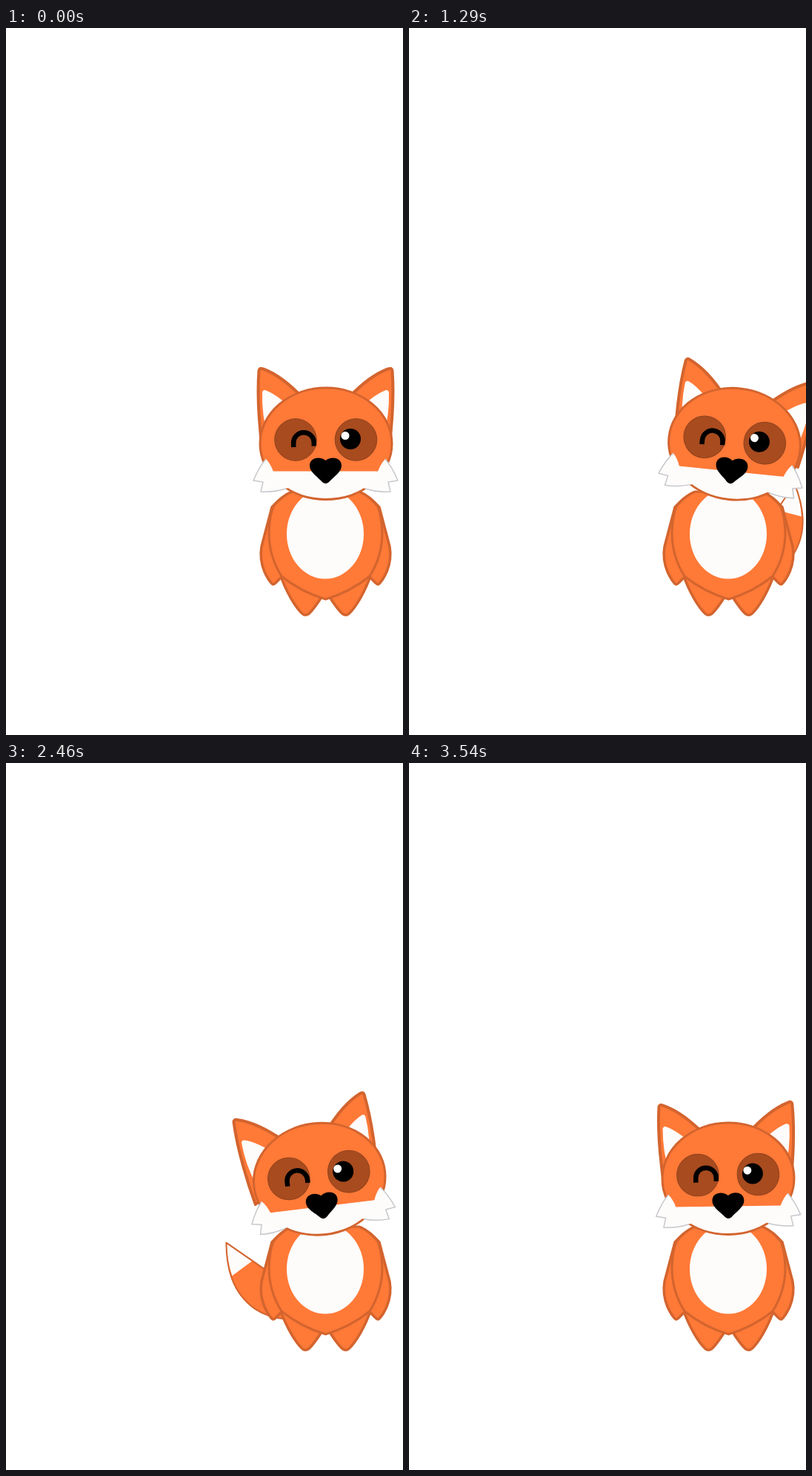
An HTML page with a canvas that plays this animation: 536 px wide and 953 px high, repeating every 3570 ms.

```html
<!DOCTYPE html>
<html lang="en">
<head>
<meta charset="utf-8">
<title>Winking fox</title>
<style>
  html, body { margin: 0; width: 100%; height: 100%; overflow: hidden; background: #fff; }
  canvas { display: block; width: 536px; height: 953px; }
</style>
</head>
<body>
<canvas id="stage" width="536" height="953"></canvas>
<script>
const ctx = document.getElementById('stage').getContext('2d');
const LOOP = 3570, STEP = 30, SWING = 3600;
const AXIS = 431.5;
const NECK = [431.5, 634];
const TAIL_ROOT = [404, 746.5];
const ORANGE = '#ff7937', LINE = '#d3642e', WHITE = '#fdfcfb', PATCH = '#a84b1f';
const path = d => new Path2D(d);

const shapes = {
  tail: path('M279 671C286 703 300 735 335 750Q355 758 380 755L410 735Q400 715 344 698Z'),
  tailTip: path('M279 671L318 688L296 713Q285 695 279 671Z'),
  ear: path('M347 576C343 548 338.500 500 341.500 462Q342 457.500 347 459.500Q373 469 402 500L380 560Z'),
  earInner: path('M346 491Q347 487 351 488.500Q366 494 390 517L354 552Q345 522 346 491Z'),
  leg: path('M370 736C378 760 391 781 400 789.500Q404 793 409 789.500Q416 783 428 764Z'),
  arm: path('M384 626Q371 632 359 646Q353 669 345 699Q342 716 349 733Q354 744 359 749Q361 751 364 748L374 738L400 690Z'),
  torso: path('M431.500 770Q398 760 372 739Q355 712 355 680Q356 657 361 645Q372 631 386 625L477 625Q491 631 502 645Q507 657 508 680Q508 712 491 739Q465 760 431.500 770Z'),
  cheek: path('M351 581Q342 591 334 610L347 612L344 625Q362 626 381 620L390 598L361 598Q357 587 351 581Z'),
  cheekEdge: path('M351 581Q342 591 334 610L347 612L344 625Q362 626 378 621'),
  wink: path('M388.200 565V559A13.800 13.800 0 0 1 415.800 559V563.500'),
  nose: path('M431.500 583C425 577 410 578 410 590C410 599 421 605 427 612Q431.500 616 436 612C442 605 453 599 453 590C453 578 438 577 431.500 583Z')
};

function paint(shape, fill, line, width) {
  if (fill) {
    ctx.fillStyle = fill;
    ctx.fill(shape);
  }
  if (line) {
    ctx.strokeStyle = line;
    ctx.lineWidth = width;
    ctx.stroke(shape);
  }
}

function oval(x, y, rx, ry = rx) {
  const shape = new Path2D();
  shape.ellipse(x, y, rx, ry, 0, 0, Math.PI * 2);
  return shape;
}

function scoped(draw) {
  ctx.save();
  draw();
  ctx.restore();
}

function mirror() {
  ctx.translate(2 * AXIS, 0);
  ctx.scale(-1, 1);
}

function bothSides(draw) {
  draw();
  scoped(() => { mirror(); draw(); });
}

function turned([x, y], degrees, draw) {
  scoped(() => {
    ctx.translate(x, y);
    ctx.rotate(degrees * Math.PI / 180);
    ctx.translate(-x, -y);
    draw();
  });
}

// The tail folds upright behind the body, then fans out on the leaning side.
function drawTail(sway) {
  const reach = Math.abs(sway);
  if (reach < 0.58) return;
  scoped(() => {
    if (sway > 0) mirror();
    turned(TAIL_ROOT, 161 * (0.988 - reach), () => {
      paint(shapes.tail, ORANGE);
      paint(shapes.tailTip, WHITE);
      paint(shapes.tail, null, LINE, 2);
    });
  });
}

function drawBody() {
  bothSides(() => paint(shapes.leg, ORANGE, LINE, 3.5));
  bothSides(() => paint(shapes.arm, ORANGE, LINE, 3.5));
  paint(shapes.torso, ORANGE, LINE, 3);
  paint(oval(431, 682, 52, 60.5), WHITE);
}

function drawEars() {
  bothSides(() => {
    paint(shapes.ear, ORANGE, LINE, 4);
    paint(shapes.earInner, WHITE);
  });
}

function drawHead() {
  const skull = oval(432, 560.3, 89, 75.2);
  paint(skull, ORANGE);
  scoped(() => {
    ctx.clip(skull);
    ctx.fillStyle = WHITE;
    ctx.fillRect(340, 597.5, 184, 45);
  });
  paint(skull, null, LINE, 3);
  bothSides(() => {
    paint(shapes.cheek, WHITE);
    paint(shapes.cheekEdge, null, '#c8c8cd', 1.5);
  });
  for (const x of [391, 472.5]) paint(oval(x, 555, 28.3), PATCH, '#8e421d', 1);
  paint(shapes.wink, null, '#000', 6.5);
  paint(oval(465, 554, 14), '#000');
  paint(oval(458, 549.5, 5.5), WHITE);
  paint(shapes.nose, '#000');
}

function render(time) {
  const sway = Math.sin(2 * Math.PI * time / SWING);
  ctx.fillStyle = '#fff';
  ctx.fillRect(0, 0, 536, 953);
  drawTail(sway);
  drawBody();
  turned(NECK, 13.2 * sway, drawEars);
  turned(NECK, 7.5 * sway, drawHead);
}

ctx.lineJoin = 'round';
const start = performance.now();

function tick() {
  const elapsed = (performance.now() - start) % LOOP;
  render(Math.floor(elapsed / STEP) * STEP);
  requestAnimationFrame(tick);
}
tick();
</script>
</body>
</html>
```
